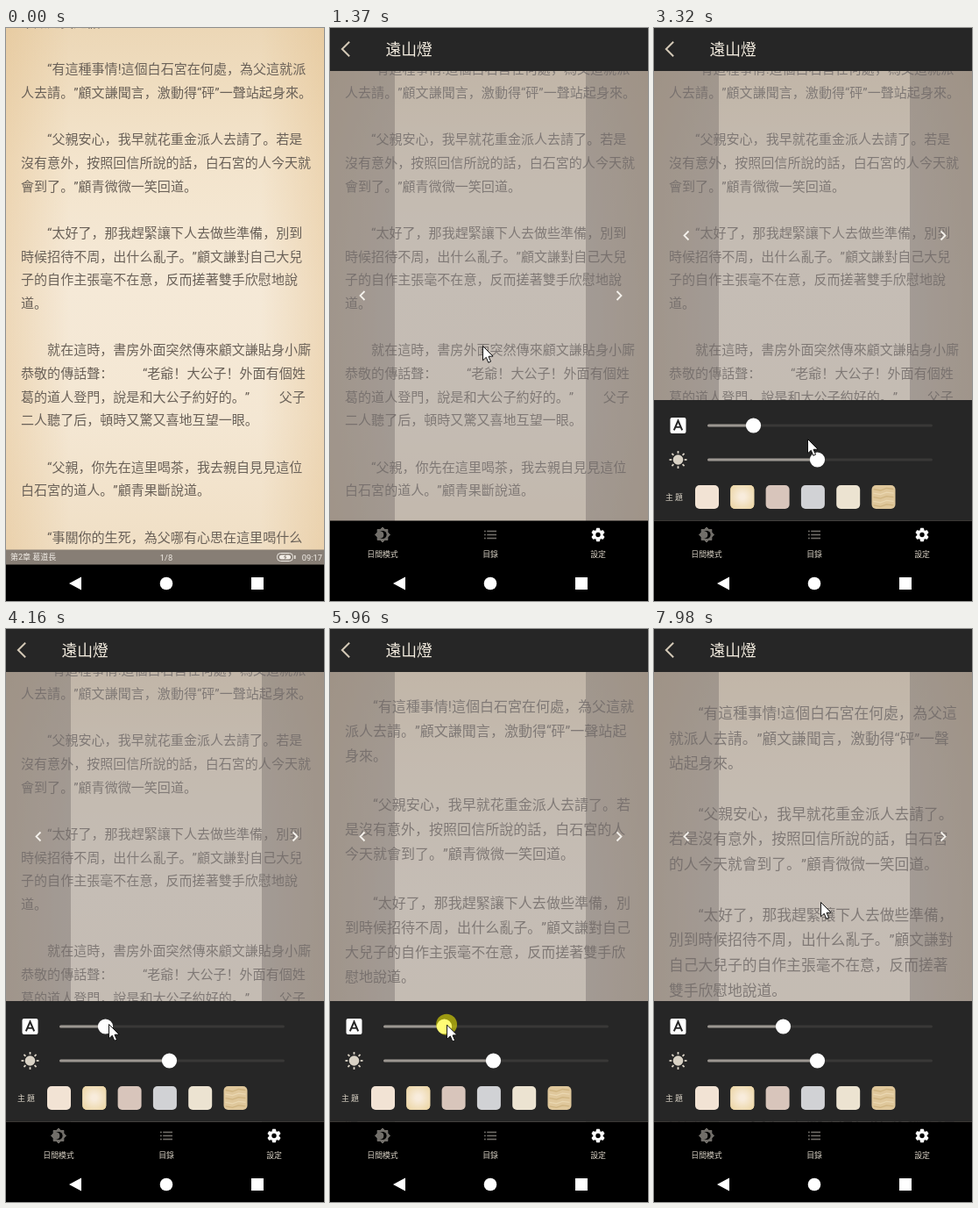
Write an HTML page with a canvas that moves like this. It is 363 by 653 pixels and loops after 8000 ms.

```html
<!DOCTYPE html>
<html lang="zh">
<head>
<meta charset="utf-8">
<title>Reader settings</title>
<style>
html, body { margin: 0; width: 100%; height: 100%; overflow: hidden; background: #000; }
canvas { display: block; width: 363px; height: 653px; }
</style>
</head>
<body>
<canvas id="stage"></canvas>
<script>
const W = 363, H = 653, LOOP = 8000;
const FONT = 'Roboto, "Noto Sans CJK SC", "Noto Sans CJK TC", "Noto Sans CJK JP", "Noto Sans CJK", sans-serif';
const INK = '#6a6158', LABEL = '#d9d2c5', DIM = '#716e69', BAR = '#262626', WHITE = '#fff';
const canvas = document.getElementById('stage');
const ctx = canvas.getContext('2d');
const ratio = window.devicePixelRatio || 1;
canvas.width = W * ratio;
canvas.height = H * ratio;
ctx.scale(ratio, ratio);

const INDENT = '\u3000\u3000';
const GAP = ' '.repeat(9);
const STORY = [
  '“有這種事情!這個白石宮在何處，為父這就派人去請。”顧文謙聞言，激動得“砰”一聲站起身來。',
  '“父親安心，我早就花重金派人去請了。若是沒有意外，按照回信所說的話，白石宮的人今天就會到了。”顧青微微一笑回道。',
  '“太好了，那我趕緊讓下人去做些準備，別到時候招待不周，出什么亂子。”顧文謙對自己大兒子的自作主張毫不在意，反而搓著雙手欣慰地說道。',
  `就在這時，書房外面突然傳來顧文謙貼身小廝恭敬的傳話聲：${GAP}“老爺！大公子！外面有個姓葛的道人登門，說是和大公子約好的。”${GAP}父子二人聽了后，頓時又驚又喜地互望一眼。`,
  '“父親，你先在這里喝茶，我去親自見見這位白石宮的道人。”顧青果斷說道。',
  '“事關你的生死，為父哪有心思在這里喝什么'
];

const MENU_AT = 1370, PANEL_AT = 2680;
const isPressed = t => (t >= 1180 && t < 1300) || (t >= 2440 && t < 2560) || (t >= 4670 && t < 7090);

// Cursor moves; it rests between them
const ENTER = { x: 270, y: 588 };
const MOVES = [
  { from: 560, to: 750, x: 151, y: 362 },
  { from: 930, to: 1000, x: 174, y: 362 },
  { from: 1620, to: 1760, x: 134, y: 410 },
  { from: 1760, to: 2250, x: 256, y: 576 },
  { from: 2330, to: 2360, x: 290, y: 582 },
  { from: 3010, to: 3320, x: 175, y: 468 },
  { from: 3390, to: 3780, x: 117, y: 450 },
  { from: 5040, to: 6840, x: 141, y: 451 },
  { from: 7290, to: 7480, x: 163, y: 468 },
  { from: 7620, to: 7980, x: 190, y: 311 }
];

function cursorAt(t) {
  let { x, y } = ENTER;
  for (const m of MOVES) {
    if (t < m.from) break;
    const p = Math.min(1, (t - m.from) / (m.to - m.from)) ** 0.6;
    x += (m.x - x) * p;
    y += (m.y - y) * p;
  }
  return { x, y };
}

// Text size slider: 15 stops, the knob snaps to the one nearest the pointer
const TRACK = 62.5, STEP = 17, FIRST_STOP = 3;
function stopAt(t) {
  const drag = cursorAt(Math.min(t, 7000)).x;
  return t < 4670 ? FIRST_STOP : Math.round((drag - TRACK) / STEP);
}

function layout(size) {
  ctx.font = size + 'px ' + FONT;
  const lines = [];
  for (const para of STORY) {
    let line = '';
    for (const ch of INDENT + para) {
      if (ctx.measureText(line + ch).width <= 333) { line += ch; continue; }
      // punctuation never starts a line
      const carry = '。，”'.includes(ch) ? line.slice(-1) : '';
      lines.push(line.slice(0, line.length - carry.length));
      line = carry + ch;
    }
    lines.push(line, '');
  }
  return lines;
}

function makePage(size, top, pitch) {
  return { size, top, pitch, lines: layout(size) };
}
const PAGES = [makePage(15.05, 46.5, 26.675), makePage(16.03, 87.7, 28.06), makePage(16.77, 95.7, 28.68)];

function rect(x, y, w, h, fill) {
  ctx.fillStyle = fill;
  ctx.fillRect(x, y, w, h);
}

function round(x, y, w, h, r, fill) {
  ctx.beginPath();
  ctx.roundRect(x, y, w, h, r);
  ctx.fillStyle = fill;
  ctx.fill();
}

function disc(x, y, r, fill) {
  ctx.beginPath();
  ctx.arc(x, y, r, 0, Math.PI * 2);
  ctx.fillStyle = fill;
  ctx.fill();
}

function poly(points, fill) {
  ctx.beginPath();
  points.forEach(([x, y]) => ctx.lineTo(x, y));
  ctx.closePath();
  ctx.fillStyle = fill;
  ctx.fill();
}

function stroke(points, color, width) {
  ctx.beginPath();
  points.forEach(([x, y]) => ctx.lineTo(x, y));
  ctx.strokeStyle = color;
  ctx.lineWidth = width;
  ctx.stroke();
}

// Draws around (x, y), repeated n times over a full turn
function spin(x, y, n, paint) {
  ctx.save();
  ctx.translate(x, y);
  for (let i = 0; i < n; i++) {
    paint();
    ctx.rotate(Math.PI * 2 / n);
  }
  ctx.restore();
}

function fade(gradient, ...colors) {
  colors.forEach((c, i) => gradient.addColorStop(i / (colors.length - 1), c));
  return gradient;
}

// y is the middle of the CJK glyph box
function text(str, x, y, size, fill, align = 'left') {
  ctx.font = size + 'px ' + FONT;
  ctx.textAlign = align;
  ctx.fillStyle = fill;
  ctx.fillText(str, x, y + size * 0.38);
}

function paper() {
  rect(0, 0, W, 595, fade(ctx.createLinearGradient(0, 0, 0, 595),
    '#ecd7b6', '#f3e4cc', '#f5e9d7', '#f4e7d3', '#f0dfc5'));
  const edge = 'rgba(222,180,120,.32)', clear = 'rgba(222,180,120,0)';
  rect(0, 0, W, 595, fade(ctx.createLinearGradient(0, 0, W, 0), edge, clear, clear, clear, clear, edge));
}

function page({ size, top, pitch, lines }) {
  paper();
  text('不知是真是假”', 17, top - 2 * pitch, size, INK);
  lines.forEach((line, i) => text(line, 17, top + i * pitch, size, INK));
}

function statusBar() {
  const c = '#f1ece5', back = '#877e75';
  rect(0, 594.5, W, 18, back);
  text('第2章 葛道長', 5, 603, 9, c);
  text('1/8', 183, 603, 9.3, c, 'center');
  text('09:17', 361, 603, 9.3, c, 'right');
  ctx.beginPath();
  ctx.roundRect(309.5, 598.5, 18, 9, 4);
  ctx.strokeStyle = c;
  ctx.lineWidth = 1;
  ctx.stroke();
  round(312, 600.5, 13, 5, 2.5, c);
  rect(329, 601, 1.5, 4, c);
  stroke([[319.5, 600.5], [317.5, 603], [320, 603], [318, 605.5]], back, 1);
}

function navBar() {
  rect(0, 611.5, W, 42, '#000');
  poly([[72, 633], [86, 625.5], [86, 640.5]], WHITE);
  disc(183, 633, 7.3, WHITE);
  rect(280, 626, 14, 14, WHITE);
}

function chevron(x, y, dir, r, color, width) {
  stroke([[x - r / 2 * dir, y - r], [x + r / 2 * dir, y], [x - r / 2 * dir, y + r]], color, width);
}

function moonIcon(x, y) {
  spin(x, y, 8, () => rect(-6.1, -6.1, 12.2, 12.2, DIM));
  disc(x, y, 4.6, '#000');
  disc(x - 2.7, y, 4, DIM);
}

function listIcon(x, y) {
  for (let row = -1; row <= 1; row++) {
    const top = y + row * 4 - 0.8;
    rect(x - 7, top, 1.8, 1.6, DIM);
    rect(x - 3.8, top, 10.8, 1.6, DIM);
  }
}

function gearIcon(x, y) {
  disc(x, y, 5.7, WHITE);
  spin(x, y, 6, () => poly([[-2.6, -5], [-1.7, -7.7], [1.7, -7.7], [2.6, -5]], WHITE));
  disc(x, y, 2.7, '#000');
}

function sunIcon(x, y) {
  disc(x, y, 5.8, LABEL);
  spin(x, y, 8, () => rect(-0.9, -10, 1.8, 2.8, LABEL));
}

function menu(arrowY) {
  rect(0, 49, W, 513, 'rgba(150,146,147,.5)');
  for (const x of [0, 292]) rect(x, 49, 74, 513, 'rgba(110,102,98,.39)');
  chevron(37, arrowY, -1, 5, '#f4f1ec', 1.8);
  chevron(330, arrowY, 1, 5, '#f4f1ec', 1.8);

  rect(0, 0, W, 49, BAR);
  chevron(18, 24, -1, 8.3, '#d3c8b6', 2);
  text('遠山燈', 63.5, 24, 17.8, '#f3ecdf');

  rect(0, 561.5, W, 51, '#000');
  moonIcon(60, 577.5);
  listIcon(183, 577.5);
  gearIcon(306, 577.5);
  ['日間模式', '目錄', '設定'].forEach((s, i) => text(s, 60 + i * 123, 599.7, 8.9, LABEL, 'center'));
}

function slider(y, x) {
  round(61, y - 1.5, 257, 3, 1.5, '#393837');
  round(61, y - 1.5, x - 61, 3, 1.5, '#9c9791');
  disc(x, y, 8.6, WHITE);
}

function swatch(fill, i) {
  const x = 47 + i * 40.3, y = 521;
  round(x, y, 27, 27, 5, fill);
  if (i === 1) {
    const glow = ctx.createRadialGradient(x + 13.5, y + 13, 3, x + 13.5, y + 13, 17);
    round(x, y, 27, 27, 5, fade(glow, '#f8ecdc', fill));
  }
  if (i === 5) {
    for (let k = 0; k < 5; k++) {
      const ly = y + 4.5 + k * 4.6;
      stroke([[x + 2, ly], [x + 10, ly + 1.5], [x + 17, ly - 1], [x + 25, ly]], k % 2 ? '#ead7b1' : '#cfb481', 1.3);
    }
  }
}

function panel(stop) {
  rect(0, 424, W, 137.5, BAR);
  round(18.5, 444, 18, 18, 2, WHITE);
  stroke([[22.8, 458.3], [27.5, 447.5], [32.2, 458.3]], BAR, 2);
  stroke([[24.6, 454.8], [30.4, 454.8]], BAR, 1.8);
  slider(453, TRACK + STEP * stop);
  sunIcon(27.5, 492);
  slider(492, 186.5);
  text('主 題', 13, 534.5, 8.9, LABEL);
  ['#f2e3d4', '#ecd6a6', '#d8c5bb', '#d1d2d5', '#ece3d1', '#dfc79b'].forEach(swatch);
}

function cursor(t) {
  if (t < MOVES[0].from) return;
  const { x, y } = cursorAt(t);
  if (isPressed(t)) disc(x, y, 12, 'rgba(255,250,0,.54)');
  ctx.save();
  ctx.translate(x + 0.5, y + 0.5);
  poly([[0, 0], [0, 16.3], [3.8, 12.8], [6.3, 18.8], [9, 17.6], [6.5, 11.8], [11.6, 11.6]], WHITE);
  ctx.strokeStyle = '#111';
  ctx.lineWidth = 1;
  ctx.stroke();
  ctx.restore();
}

function draw(t) {
  const stop = stopAt(t), open = t >= PANEL_AT;
  page(PAGES[stop - FIRST_STOP]);
  statusBar();
  if (t >= MENU_AT) menu(open ? 236.5 : 305);
  if (open) panel(stop);
  navBar();
  cursor(t);
}

const start = performance.now();
function tick() {
  draw((performance.now() - start) % LOOP);
  requestAnimationFrame(tick);
}
tick();
</script>
</body>
</html>
```
